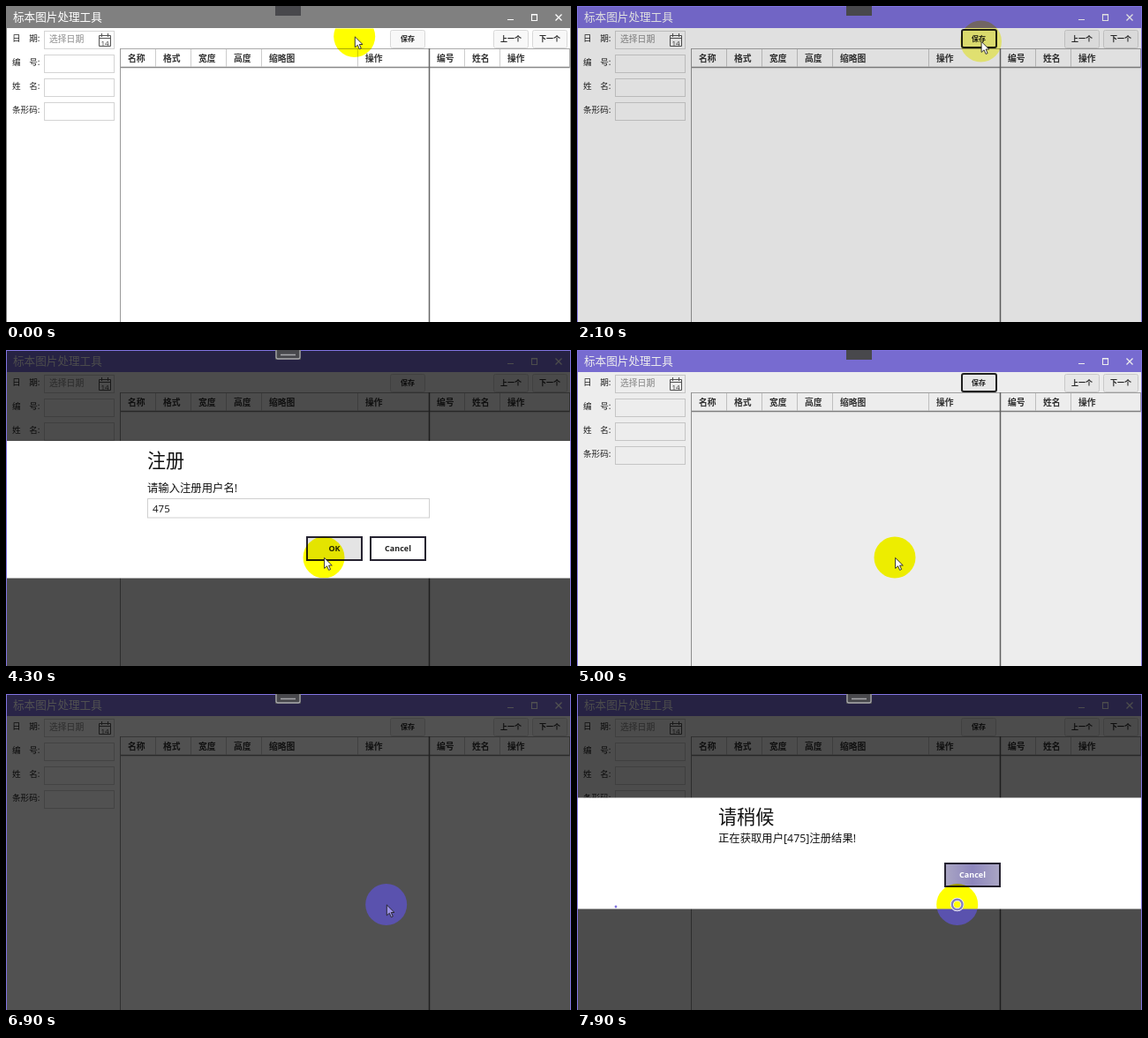
Write an HTML page that moves like this. It is 640 by 358 pixels and loops after 8000 ms.

```html
<!DOCTYPE html>
<html lang="zh">
<head>
<meta charset="utf-8">
<style>
html, body { margin: 0; width: 100%; height: 100%; overflow: hidden; background: #fff; }
svg { display: block; width: 100%; height: 100%; }
text { font-family: "Open Sans", "Noto Sans CJK SC", "Noto Sans CJK", sans-serif; white-space: pre; }
.cjk { font-family: "Noto Sans CJK SC", "Noto Sans CJK", sans-serif; }
</style>
</head>
<body>
<svg id="stage" viewBox="0 0 640 358"></svg>
<script>
const LOOP = 8000;
const ACCENT = '#8073e0';
const USER = '475';

const rect = (x, y, w, h, attrs) => `<rect x="${x}" y="${y}" width="${w}" height="${h}" ${attrs}/>`;
const box = (x, y, w, h, stroke, attrs = 'fill="#fff"') =>
  rect(x + .5, y + .5, w - 1, h - 1, `stroke="${stroke}" ${attrs}`);
const text = (x, y, size, str, attrs = '') =>
  `<text x="${x}" y="${y}" font-size="${size}" ${attrs}>${str}</text>`;
const cjk = (x, y, size, str, attrs = '') => text(x, y, size, str, `class="cjk" ${attrs}`);
const path = (d, attrs) => `<path d="${d}" fill="none" ${attrs}/>`;

const toolButton = (x, label) =>
  box(x, 27, 40, 21, '#d8d8d8', 'fill="#f8f8f8" rx="2"') +
  cjk(x + 20, 40.3, 8, label, 'text-anchor="middle" font-weight="700" fill="#222"');

const dialogButton = (id, x, y, label, fill = '#fff', color = '#222') =>
  rect(x + 1, y + 1, 62, 26, `id="${id}" fill="${fill}" stroke="#252230" stroke-width="2"`) +
  text(x + 32, y + 17, 9, label, `text-anchor="middle" font-weight="700" fill="${color}"`);

function header(columns, left, right) {
  const cells = columns.map(([x, label], i) =>
    cjk(x, 62.5, 9.8, label, 'font-weight="700" fill="#333"') +
    (i ? path(`M${x - 8.5} 49V69`, 'stroke="#ccc"') : '')).join('');
  return path(`M${left} 48.5H${right}`, 'stroke="#aaa"') +
    path(`M${left} 69.5H${right}`, 'stroke="#888" stroke-width="1.5"') + cells;
}

function mainWindow() {
  const labels = ['日　期:', '编　号:', '姓　名:', '条形码:'];
  const fields = labels.map((label, i) =>
    cjk(7, 40.2 + 27 * i, 9.6, label, 'fill="#222"') +
    box(43, 28 + 27 * i, 80, 21, '#d4d4d4')).join('');
  const calendar = path('M105.5 33.5H118.5V45.5H105.5ZM105.5 36.5H118.5M108.5 31V35M115.5 31V35',
    'stroke="#555"') + text(112, 44.5, 8, '14', 'text-anchor="middle" fill="#333"');
  return rect(0, 0, 640, 358, 'fill="#fff"') +
    rect(0, 0, 640, 25, 'id="titleBar"') +
    cjk(8, 17.3, 12.6, '标本图片处理工具', 'font-weight="300" fill="#fff"') +
    path('M568 15.5H575M595.5 9.5H601.5V16.5H595.5ZM595 10H602', 'stroke="#fff" stroke-width="1.1"') +
    path('M622.5 9.5L629.5 16.5M629.5 9.5L622.5 16.5', 'stroke="#fff" stroke-width="1.3"') +
    fields + cjk(49, 41, 9.8, '选择日期', 'fill="#888"') + calendar +
    toolButton(435, '保存') + toolButton(552, '上一个') + toolButton(596, '下一个') +
    rect(436, 27, 39, 20, 'id="saveFocus" rx="2" fill="none" stroke="#222" stroke-width="2"') +
    header([[138, '名称'], [178, '格式'], [218, '宽度'], [258, '高度'], [298, '缩略图'], [407, '操作']], 129, 479) +
    header([[488, '编号'], [528, '姓名'], [568, '操作']], 480, 639) +
    path('M129.5 48V358', 'stroke="#999"') +
    path('M479.5 48V358', 'stroke="#666" stroke-width="1.5"') +
    path('M638.5 48V70', 'stroke="#aaa"');
}

// Dialogs: top, height, time shown, time closed
const DIALOGS = {
  askName: [103, 155.5, 2400, 4500],
  askPassword: [89.5, 181.5, 5200, 6700],
  waiting: [117.5, 126, 7500, 8100]
};

function dialog(id, title, messageY, message, body) {
  const [top, height] = DIALOGS[id];
  return `<g id="${id}">` + rect(1, top, 638, height, `fill="#fff"`) +
    cjk(160, top + 29.5, 21.1, title, 'fill="#111"') +
    text(160, messageY, 12.35, message, 'fill="#111"') + body + '</g>';
}
const caret = (id, y) => rect(165, y, 1, 16, `id="${id}" fill="#111"`);

const dialogs =
  dialog('askName', '注册', 161.3, '请输入注册用户名!',
    box(160, 168, 320, 22.5, '#ccc', 'id="nameBox" fill="#fff"') +
    text(166, 184, 11.5, '', 'id="nameText" fill="#111"') + caret('nameCaret', 171) +
    dialogButton('okButton', 340, 211, 'OK') + dialogButton('cancelButton', 412, 211, 'Cancel')) +
  dialog('askPassword', '注册', 148.3, '请输入注册用户名以及密码!',
    box(160, 155, 320, 22.5, '#ccc') + text(166, 171, 11.5, USER, 'fill="#111"') +
    box(160, 181, 320, 23, '#333') +
    text(167, 197, 11.5, '', 'id="passText"') + caret('passCaret', 185) +
    dialogButton('signButton', 412, 223.5, '注册', '#8577e2', '#fff')) +
  dialog('waiting', '请稍候', 168.3, `正在获取用户[${USER}]注册结果!`,
    dialogButton('stopButton', 416, 191, 'Cancel', 'url(#sheen)', '#fff') +
    `<g id="dots" fill="${ACCENT}">` + '<circle cy="241" r="1.4"/>'.repeat(3) + '</g>');

const stage = document.getElementById('stage');
stage.innerHTML = `<defs>
  <linearGradient id="sheen"><stop offset="0" stop-color="#aaa6c4"/><stop offset=".5" stop-color="#8d86bd"/><stop offset="1" stop-color="#aaa6c4"/></linearGradient>
  <clipPath id="sheet"><rect id="sheetRect" x="1" width="638"/></clipPath>
  <clipPath id="client"><rect id="clientRect" width="640" height="358"/></clipPath></defs>` +
  mainWindow() +
  rect(0, 0, 640, 358, 'id="shade" fill="#000"') +
  box(0, 0, 640, 360, ACCENT, 'id="frame" fill="none"') +
  '<g id="groundLight" clip-path="url(#client)"><circle class="halo" id="ground" r="23.5"/></g>' +
  rect(305, 0, 29, 11, 'fill="#48484c"') +
  path('M306 0V8Q306 10 308 10H331Q333 10 333 8V0M311 5.5H328', 'id="tabLines" stroke="#a8a8ac" stroke-width="1.3"') +
  dialogs +
  '<g clip-path="url(#sheet)" style="mix-blend-mode:multiply"><circle class="halo" r="23.5" fill="#ff0"/></g>' +
  '<path id="arrow" d="M0 0V12L3 9.4L5 14L7 13.1L5 8.6H8.7Z" stroke="#222" stroke-width=".9"/>' +
  `<circle id="busy" r="5.8" fill="none" stroke="#fff" stroke-width="4"/>
   <circle id="busyRing" r="5.8" fill="none" stroke="#8580bd" stroke-width="2.4"/>`;

const el = {};
stage.querySelectorAll('[id]').forEach(node => el[node.id] = node);
const halos = stage.querySelectorAll('.halo');
const set = (node, attrs) => { for (const k in attrs) node.setAttribute(k, attrs[k]); };
const show = (node, on) => node.style.display = on ? '' : 'none';
const ramp = (t, from, to) => Math.min(1, Math.max(0, (t - from) / (to - from)));
const ease = p => p * p * (3 - 2 * p);

// Pointer moves: start, end, x, y
const MOVES = [[500, 1500, 457.5, 40], [3600, 4100, 360, 235], [6100, 6500, 430.7, 238.5]];
function pointer(t) {
  let x = 394.7, y = 34.5;
  for (const [from, to, nx, ny] of MOVES) {
    const p = ease(ramp(t, from, to));
    x += (nx - x) * p;
    y += (ny - y) * p;
  }
  return [x, y];
}

// Shade fades: in from/to, out from/to
const FADES = [[2030, 2430, 4500, 4850], [4960, 5360, 6890, 7250], [7300, 7650, 9000, 9100]];
const shadeAt = t => .7 * Math.max(...FADES.map(([a, b, c, d]) => ramp(t, a, b) * (1 - ramp(t, c, d))));

function draw(t) {
  const active = t >= 100, shade = shadeAt(t), dark = shade > .6;
  const [x, y] = pointer(t);
  set(el.titleBar, { fill: active ? ACCENT : '#808080' });
  set(el.frame, { stroke: active ? ACCENT : '#808080' });
  set(el.shade, { opacity: shade });
  show(el.saveFocus, t >= 1700 && !dark);
  show(el.tabLines, dark);

  let sheetTop = 0, sheetHeight = 0;
  for (const [id, [top, height, from, to]] of Object.entries(DIALOGS)) {
    const on = t >= from && t < to;
    show(el[id], on);
    set(el[id], { opacity: ramp(t, from - 100, from + 200) });
    if (on) [sheetTop, sheetHeight] = [top, height];
  }
  set(el.sheetRect, { y: sheetTop, height: sheetHeight });
  set(el.clientRect, { y: active ? 0 : 25.5 });

  el.nameText.textContent = USER.slice(0, Math.floor(ramp(t, 2800, 3400) * 3));
  set(el.nameCaret, { x: 166 + 6.6 * el.nameText.textContent.length });
  show(el.nameCaret, t < 4200);
  set(el.nameBox, { stroke: t < 4200 ? '#333' : '#d0d0d0' });
  set(el.okButton, { fill: t >= 4000 ? '#e4e4e4' : '#fff' });
  const typed = Math.floor(ramp(t, 5600, 6000) * 3);
  el.passText.textContent = typed ? '●'.repeat(typed) : 'Password...';
  set(el.passText, { fill: typed ? '#111' : '#bbb' });
  set(el.passCaret, { x: 165 + 11 * typed });
  [...el.dots.children].forEach((dot, i) => set(dot, { cx: 44 + (t - 7900) * .3 - i * 60 }));

  halos.forEach(halo => set(halo, { cx: x, cy: y }));
  const tint = shade > .05 && t < 2500 ? '#ffff80' : '#ff0';
  set(el.ground, { fill: dark ? '#5a52ae' : tint });
  el.groundLight.style.mixBlendMode = dark ? 'normal' : 'multiply';
  const busy = t >= 7600;
  show(el.arrow, !busy);
  show(el.busy, busy);
  show(el.busyRing, busy);
  set(el.arrow, { transform: `translate(${x + .6} ${y + .4})`, fill: dark && !sheetHeight ? '#9d93e6' : '#fff' });
  for (const ring of [el.busy, el.busyRing]) set(ring, { cx: x, cy: y });
}

const start = performance.now();
function tick() {
  const t = (performance.now() - start) % LOOP;
  draw(Math.floor(t / 100) * 100);
  requestAnimationFrame(tick);
}
tick();
</script>
</body>
</html>
```
